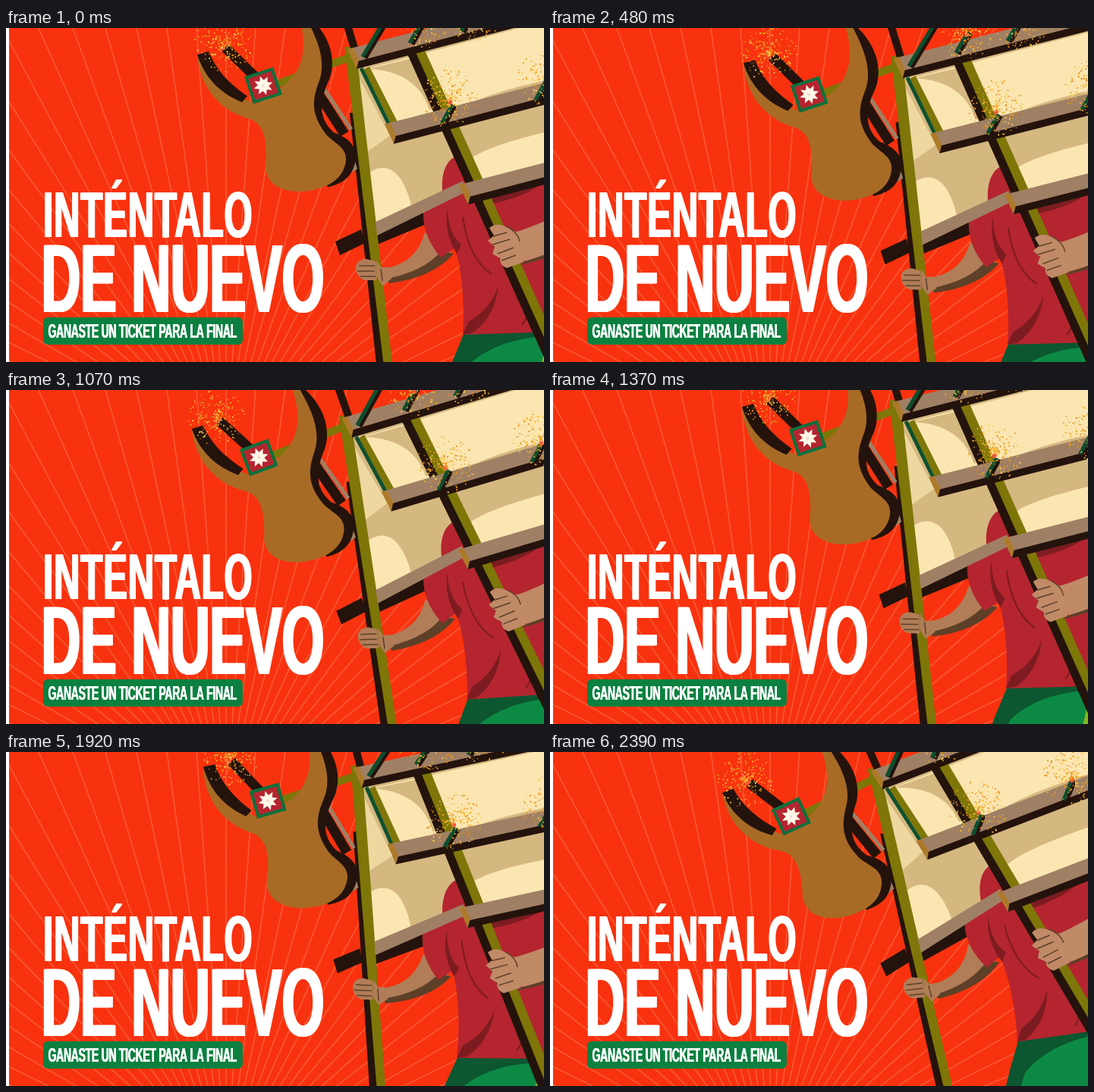
These frames come from a looping animation (709 by 441 pixels, 2.47 s). An HTML page with a canvas:

```html
<!DOCTYPE html>
<html lang="es">
<head>
<meta charset="utf-8">
<title>Inténtalo de nuevo</title>
<style>
html, body { margin: 0; width: 100%; height: 100%; overflow: hidden; background: #fff; }
canvas { display: block; }
</style>
</head>
<body>
<canvas id="stage" width="709" height="441"></canvas>
<script>
const ctx = document.getElementById('stage').getContext('2d');
const LOOP = 2470, STEPS = 32;
const RED = '#f8320e', DARK = '#24130d', OLIVE = '#7e7608', WOOD = '#a08064', OCHRE = '#ad7a2c',
  CREAM = '#fbe6b2', TAN = '#d5b880', BROWN = '#a86b26', SHIRT = '#b4252f', MAROON = '#7d1c20',
  SKIN = '#b07d58', PALM = '#c08a67', SHADE = '#5d4027', PINE = '#0f5030', GREEN = '#0b8040';

// Sway of the puppet: [step, dx, dy, degrees]
const SWAY = [
  [0, 0, 0, 0], [2, -6, -20, -6.8], [4, 0, -2, 1], [6, 2, 13, .3], [8, -4, -8, -5],
  [9, -6, -20, -6.8], [10, -4, -21, -1.8], [12, 0, 0, 2], [14, -1, 4, -2], [16, -6, -20, -5.8],
  [18, 0, -11, .3], [20, 2, 12, 1.5], [23, -6, -20, -5.8], [25, 0, -1, 2.4], [27, 2, 13, 1],
  [29, -4, -8, -4], [31, -7, -21, -6.4], [32, 0, 0, 0]
];

function pose(step) {
  const k = SWAY.findIndex(key => key[0] > step);
  const a = SWAY[k - 1], b = SWAY[k];
  const u = (step - a[0]) / (b[0] - a[0]), e = u * u * (3 - 2 * u);
  return [1, 2, 3].map(i => a[i] + (b[i] - a[i]) * e);
}

function fill(color, d) {
  ctx.fillStyle = color;
  ctx.fill(new Path2D(d));
}

function line(color, width, d) {
  ctx.strokeStyle = color;
  ctx.lineWidth = width;
  ctx.stroke(new Path2D(d));
}

function random(seed) {
  return () => (seed = (seed * 16807) % 2147483647) / 2147483647;
}

function rays() {
  ctx.fillStyle = '#fff';
  ctx.fillRect(0, 0, 709, 441);
  ctx.fillStyle = RED;
  ctx.fillRect(4, 0, 705, 441);
  ctx.save();
  ctx.beginPath();
  ctx.rect(4, 0, 705, 441);
  ctx.clip();
  ctx.strokeStyle = '#fa5532';
  ctx.lineWidth = 1.8;
  ctx.beginPath();
  for (let deg = -88; deg < 90; deg += 4) {
    const a = deg * Math.PI / 180;
    ctx.moveTo(290, 555);
    ctx.lineTo(290 + 800 * Math.sin(a), 555 - 800 * Math.cos(a));
  }
  ctx.stroke();
  ctx.restore();
}

// Condensed heavy lettering
function label(text, x, y, size, spacing) {
  ctx.save();
  ctx.translate(x, y);
  ctx.scale(.56, 1);
  ctx.font = `bold ${size}px "Liberation Sans", Arial, sans-serif`;
  ctx.letterSpacing = spacing + 'px';
  ctx.fillStyle = '#fff';
  for (const shift of [-.022, 0, .022]) ctx.fillText(text, shift * size, 0);
  ctx.restore();
}

function cloth() {
  fill(TAN, 'M455 45L770-35V190L605 215L485 268Z');
  fill(CREAM, 'M470 55L770-25V75L512 132Z');
  fill(TAN, 'M478 54C522 56 548 76 558 108L580 104L550 36Z');
  fill(TAN, 'M598 106C635 86 695 70 770 58V80Z');
  fill('#eed8a0', 'M461 58L506 142L474 165Z');
  fill(CREAM, 'M474 194C500 174 522 186 534 234L486 260Z');
  fill(CREAM, 'M600 182C626 156 690 142 770 124V175L620 212Z');
}

function man() {
  fill(DARK, 'M488 268L562 238L556 258L489 286Z');
  fill('#0c5630', 'M604 402L721 400L708 470L690 530H555L588 441Z');
  fill('#0c8a44', 'M608 446Q646 410 714 407L690 530H570Z');
  line('#86b51d', 8, 'M716 404Q714 440 690 510');
  fill(SKIN, 'M552 270L588 298Q562 329 505 336L493 318Q540 314 552 270Z');
  fill(SHADE, 'M574 294L590 298Q562 330 505 337L502 331Q552 321 574 294Z');
  fill(SHIRT, 'M575 215C573 186 584 168 602 167L624 220L760 185V400L602 405Q606 340 592 290L573 303Q549 275 550 244Q560 226 575 215Z');
  fill(MAROON, 'M582 236Q582 270 600 286L594 298Q576 270 582 236Z');
  fill(MAROON, 'M649 340Q638 372 609 388L602 405L614 403Q644 383 649 340Z');
  fill(MAROON, 'M632 234Q690 222 709 202V196L622 220Z');
  line(MAROON, 2, 'M602 250Q610 305 640 325M694 352Q690 380 680 392');
}

function poles() {
  fill(DARK, 'M453 112L462 112L508 520H496Z');
  fill(OLIVE, 'M446 25L461 25L518 520H507Z');
  line(OLIVE, 9, 'M475 53L514 130');
  line(PINE, 5, 'M468 53L508 134');
  line(DARK, 10, 'M440-35L459 26');
  line(DARK, 12, 'M530 22L752 516');
  line(OLIVE, 12, 'M542 22L764 516');
}

// Slanted beam; x, y is its upper left corner
function beam(x, y) {
  const right = 780, end = y - (right - x) * .26;
  fill(DARK, `M${x + 9} ${y + 16}L${right} ${end + 18}V${end + 29}L${x + 12} ${y + 26}Z`);
  fill(WOOD, `M${x} ${y}L${right} ${end}V${end + 19}L${x + 9} ${y + 17}Z`);
  fill(OCHRE, `M${x} ${y}L${x + 7} ${y - 2}L${x + 15} ${y + 14}L${x + 12} ${y + 26}Z`);
}

function cracker(x, y, dx, dy) {
  line(DARK, 9, `M${x + 2} ${y + 1}l${dx} ${dy}`);
  line('#0e4e2e', 5, `M${x} ${y}l${dx} ${dy}`);
}

function frame() {
  fill(WOOD, 'M487 256L602 202L607 216L489 274Z');
  fill(DARK, 'M434 282L468 266L473 284L440 300Z');
  beam(450, 28);
  beam(499, 127);
  beam(597, 207);
  cracker(470, 38, 32, -54);
  cracker(532, 20, 16, -28);
  cracker(600, 4, 16, -28);
  cracker(574, 127, 14, -26);
  cracker(698, 95, 14, -26);
}

function hands() {
  fill(SKIN, 'M461 316Q462 306 475 305L487 308L488 333L472 333Q461 328 461 316Z');
  fill(SKIN, 'M488 306L494 316L506 316L508 331L496 340L488 328Z');
  line(SHADE, 1.5, 'M465 314H486M463 321H486M467 328H487M494 318L496 334');
  fill(PALM, 'M669 270Q696 263 765 230V278Q719 298 684 308Z');
  fill(SHADE, 'M684 308Q719 298 765 274V282Q712 306 676 313Z');
  fill(PALM, 'M637 264Q646 256 658 262L676 271L690 292L682 309L660 317Q650 313 651 304L641 298L644 289L635 281L643 274Z');
  line(SHADE, 1.5, 'M642 275L660 270M641 286L664 279M648 298L669 290M653 307L672 300M660 262Q675 270 677 282');
}

function bull() {
  line(OLIVE, 10, 'M352 76L452 39');
  fill(WOOD, 'M430 194L455 160L463 186L438 202Z');
  line(DARK, 13, 'M410 84L446 140');
  line(WOOD, 5, 'M419 80L455 134');
  fill(DARK, 'M394-20C430 10 435 44 426 68C412 98 412 120 432 138C454 146 464 158 460 178C455 200 440 206 424 210L396 150Z');
  line(DARK, 13, 'M289 26L331 67');
  fill(BROWN, 'M252 36C256 82 286 110 318 119C336 124 346 140 342 184C343 204 360 216 388 216C422 214 446 200 448 174C449 156 428 150 420 138C404 116 402 98 412 72C424 42 408 10 392-20H384C398 20 396 58 358 82L330 100C300 90 276 68 266 40Z');
  fill(DARK, 'M252 35L267 31C277 56 295 74 318 90L311 98C282 86 262 66 252 35Z');
  ctx.save();
  ctx.translate(339, 76);
  ctx.rotate(-.32);
  ctx.fillStyle = '#0b713c';
  ctx.fillRect(-20, -19, 40, 38);
  ctx.fillStyle = SHIRT;
  ctx.fillRect(-16, -15, 32, 30);
  for (let i = 0; i < 8; i++) {
    fill('#fff7e8', 'M0 0L-3-6L0-13L3-6Z');
    ctx.rotate(Math.PI / 4);
  }
  ctx.restore();
}

function sparks(step) {
  const rnd = random(917 + step * 7919);
  const colors = ['#f6b51f', '#f08a1c', '#ffd45a', '#d89a20'];
  for (const [x, y] of [[285, 24], [545, -6], [584, 96], [616, -18], [711, 68]]) {
    ctx.fillStyle = '#f0503c';
    ctx.beginPath();
    ctx.arc(x + 1, y + 2, 3, 0, 7);
    ctx.fill();
    for (let i = 0; i < 230; i++) {
      const a = rnd() * 2 * Math.PI, r = 38 * rnd(), size = 1 + rnd();
      ctx.fillStyle = colors[i % 4];
      ctx.fillRect(x + r * Math.cos(a), y - 4 + r * Math.sin(a), size, size);
    }
  }
}

function draw(now) {
  const step = Math.floor((now % LOOP + 25) / (LOOP / STEPS)) % STEPS;
  const [dx, dy, deg] = pose(step);
  rays();
  ctx.save();
  ctx.translate(600 + dx, 217 + dy);
  ctx.rotate(deg * Math.PI / 180);
  ctx.translate(-600, -217);
  cloth();
  man();
  poles();
  frame();
  hands();
  bull();
  sparks(step);
  ctx.restore();

  ctx.fillStyle = GREEN;
  ctx.beginPath();
  ctx.roundRect(49, 382, 263, 36, 6);
  ctx.fill();
  label('INTÉNTALO', 49, 276, 85, 1.5);
  label('DE NUEVO', 46.5, 375, 128, -.4);
  label('GANASTE UN TICKET PARA LA FINAL', 55.5, 409, 25, -.5);
}

const start = performance.now();
(function tick() {
  draw(performance.now() - start);
  requestAnimationFrame(tick);
})();
</script>
</body>
</html>
```
